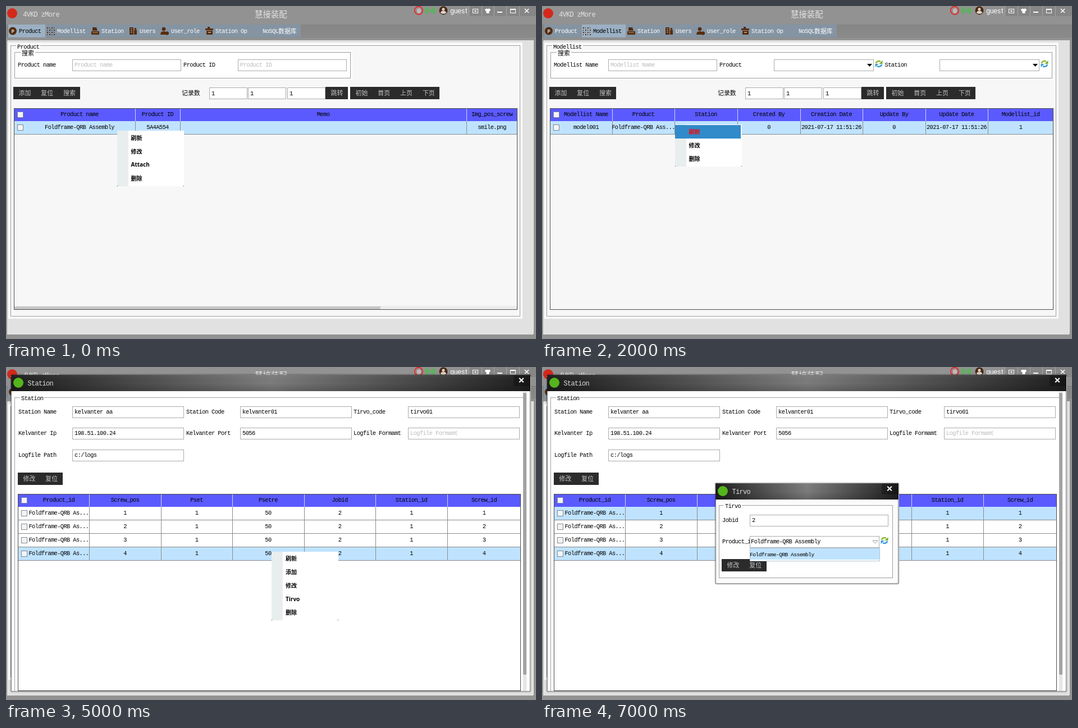
Recreate the animation shown at these times as an HTML page. Size 944 px wide and 593 px high, loop 8 s.

```html
<!DOCTYPE html>
<html lang="zh">
<head>
<meta charset="utf-8">
<title>Station manager</title>
<style>
  html, body { margin: 0; width: 100%; height: 100%; overflow: hidden; background: #929292; }
  #stage { display: block; width: 100vw; height: 100vh; }
  #stage rect { shape-rendering: crispEdges; }
  text { font-family: "Noto Sans CJK SC", "Noto Sans CJK", sans-serif; white-space: pre; }
  text.mono { font-family: "Liberation Mono", monospace; letter-spacing: -.058em; }
  text.ui { font-family: "Open Sans", "Noto Sans CJK SC", "Noto Sans CJK", sans-serif; font-weight: 700; }
</style>
</head>
<body>
<svg id="stage" viewBox="0 0 944 593" preserveAspectRatio="none"></svg>
<script>
const STEP = 1000;
const MONO = 10.4, CJK = 10.9, TITLE = 12, ADVANCE = 5.64;
const BLUE = '#5a5aff', PICK = '#bfe3ff', DARK = '#2b2b2b', BROWN = '#572c0c';
const PART = 'Foldframe-QRB Assembly', UNIT = 'kelvanter aa';
const EDIT = ['修改', '复位'];

const fill = (x, y, x2, y2, c, more = '') =>
  `<rect x="${x}" y="${y}" width="${x2 - x}" height="${y2 - y}" fill="${c}" ${more}/>`;

const frame = (x, y, x2, y2, line, c = 'none') =>
  `<rect x="${x + .5}" y="${y + .5}" width="${x2 - x - 1}" height="${y2 - y - 1}" fill="${c}" stroke="${line}"/>`;

const path = (d, c, w = 0) => w
  ? `<path d="${d}" fill="none" stroke="${c}" stroke-width="${w}"/>`
  : `<path d="${d}" fill="${c}"/>`;

const dot = (x, y, r, c) => `<circle cx="${x}" cy="${y}" r="${r}" fill="${c}"/>`;

const isCjk = s => /[\u4e00-\u9fff]/.test(s);

// Text placed by its vertical middle.
function text(x, cy, s, { c = '#000', size = isCjk(s) ? CJK : MONO, mid = false, ui = false } = {}) {
  const y = cy + size * (isCjk(s) ? .37 : .33);
  const kind = ui ? 'ui' : isCjk(s) ? 'cjk' : 'mono';
  return `<text class="${kind}" x="${x}" y="${y.toFixed(2)}" font-size="${size}" fill="${c}"` +
    `${mid ? ' text-anchor="middle"' : ''}>${s}</text>`;
}

const legend = (x, cy, s, bg) =>
  fill(x - 2, cy - 5, x + s.length * (isCjk(s) ? CJK : ADVANCE) + 2, cy + 5, bg) + text(x, cy, s);

const checkbox = (x, cy) => frame(x, cy - 5, x + 11, cy + 6, '#7d8a94', '#f4f4f4');

function buttons(x, y, labels) {
  return fill(x, y, Math.round(x + labels.length * 39.8), y + 22, DARK) +
    labels.map((s, i) => text(x + 9.5 + i * 39.8, y + 10.5, s, { c: '#c4c4c4' })).join('');
}

function refresh(x, y) {
  return path(`M${x - 5} ${y - 1}A5 4.6 0 0 1 ${x + 3} ${y - 4}`, '#8dbb2c', 2.6) +
    path(`M${x + 6.5} ${y - 6}v6h-6z`, '#6fae2e') +
    path(`M${x + 5} ${y + 1}A5 4.6 0 0 1 ${x - 3} ${y + 4}`, '#3a9bdc', 2.6) +
    path(`M${x - 6.5} ${y + 6}v-6h6z`, '#3a9bdc');
}

// kind: '' plain, 'hint' placeholder, 'combo' closed list, 'open' opened list
function field(labelX, x, x2, cy, label, value = '', kind = '') {
  const combo = kind === 'combo' || kind === 'open';
  const right = combo ? x2 - 16 : x2;
  let s = text(labelX, cy, label) + frame(x, cy - 10, right, cy + 11, '#a9abb0', '#fff') +
    text(x + (combo ? 2 : 4), cy, value, { c: kind === 'hint' ? '#bcbcbc' : '#000' });
  if (combo) {
    const arrow = `M${right - 12} ${cy - 2}h9l-4.5 5z`;
    s += kind === 'open' ? path(arrow, '#999', 1) : path(arrow, '#000');
    s += refresh(x2 - 7, cy - 2);
  }
  return s;
}

function table({ x, y, cols, heads, rows, picked, bottom, indent, bg }) {
  const right = cols[cols.length - 1], pitch = 24;
  const cell = (i, top, s) => {
    const l = i ? cols[i - 1] : x + indent, w = cols[i] - l;
    return `<svg x="${l}" y="${top}" width="${w}" height="${pitch}">` +
      text(w / 2, 11, s, { mid: true }) + '</svg>';
  };
  const band = (cells, top, height, color, line) =>
    fill(x, top, right, top + height, color) +
    cols.slice(0, -1).map(c => fill(c, top, c + 1, top + height, line)).join('') +
    cells.map((s, i) => cell(i, top, s)).join('') +
    checkbox(x + 6, top + 11);
  let s = frame(x, y, right, bottom, '#4c4c4c', bg) + band(heads, y, 23, BLUE, '#d5d5ff');
  rows.forEach((r, i) => {
    const top = y + 23 + i * pitch, end = top + pitch - 1;
    s += band(r, top, pitch, picked.includes(i) ? PICK : '#fff', '#8a8a8a') +
      fill(x, end, right, end + 1, '#8a8a8a');
  });
  return s + frame(x, y, right, bottom, '#4c4c4c');
}

function menu(x, y, items, hot = -1) {
  const w = 119, h = items.length * 24 + 2.5;
  let s = fill(x, y, x + w, y + h, '#fff') + fill(x, y, x + 20, y + h, '#e8eeee') +
    fill(x, y + h - 1, x + 1, y + h, '#333') + fill(x + w - 1, y + h - 1, x + w, y + h, '#333');
  items.forEach((item, i) => {
    if (i === hot) s += fill(x, y + 1 + i * 24, x + w - 2, y + 25 + i * 24, '#318ac9');
    s += text(x + 25, y + 13 + i * 24, item, { c: i === hot ? '#f00' : '#000', size: 10, ui: true });
  });
  return s;
}

function windowBox(x, y, x2, y2, title) {
  const cx = x2 - 16, cy = y + 9.5;
  return `<rect x="${x - .5}" y="${y - .5}" width="${x2 - x + 1}" height="${y2 - y + 1}" rx="3" fill="#fff" stroke="#000" stroke-opacity=".16" stroke-width="3"/>` +
    frame(x, y, x2, y2, '#808080', '#fbfbfb') +
    fill(x, y, x2, y + 29, 'url(#bar)') + fill(x, y, x2, y + 29, 'url(#gloss)') +
    fill(x2 - 30, y + 1, x2 - 1, y + 20, '#000', 'opacity=".3"') +
    path(`M${cx - 3.8} ${cy - 3.8}l7.6 7.6m0 -7.6l-7.6 7.6`, '#fff', 2) +
    dot(x + 13, y + 14, 9, '#55b51c') +
    text(x + 29.5, y + 15.5, title, { c: '#dcdcdc', size: TITLE });
}

// Small centred form; each row is [label, value, kind].
function dialog(y, title, rows) {
  const n = rows.length * 38.2;
  const at = d => Math.round(y + d + n);
  return windowBox(309, y, 635, at(103), title) +
    frame(315, y + 39, 625, at(93), '#a0a0a0', '#fff') +
    legend(326, y + 41, title, '#fff') +
    rows.map(([a, b, k], i) => field(321, 370, 617, Math.round(y + 66 + i * 38.2), a, b, k)).join('') +
    buttons(320, at(59), EDIT);
}

const icons = [
  dot(12, 44.5, 7, BROWN) + text(12, 44.7, 'P', { c: '#c9d3dc', size: 9, mid: true, ui: true }),
  [0, 1, 2, 3].map(i => [0, 1, 2, 3].map(j =>
    fill(73 + i * 4, 38 + j * 4, 75 + i * 4 - (i + j) % 2, 40 + j * 4, BROWN)).join('')).join(''),
  path('M154 38h7l2 6h-9zM152 45h14v6h-14z', BROWN) + fill(154, 47, 164, 48, '#a5937f'),
  path('M220 38h7v13h-7zM228 43h5v8h-5z', BROWN) + dot(230.5, 41, 2, BROWN) +
    [40, 43, 46].map(y => fill(222, y, 225, y + 1, '#b9aa9a')).join(''),
  dot(281, 41, 3.3, BROWN) + path('M275 51q0 -6 6 -6t5 6zM287 45l3 2v3l-3 2l-3 -2v-3z', BROWN),
  path('M355 40h14v3h-14zM357 44h11v7h-11zM359 37h4v3h-4z', BROWN) + fill(360, 46, 365, 48, '#a5937f'),
  ''
];

const TABS = [[4, 23, 'Product'], [71, 91, 'Modellist'], [150, 170, 'Station'], [217, 238, 'Users'],
  [274, 294, 'User_role'], [353, 373, 'Station Op'], [438, 457, 'NoSQL']];

function chrome(active) {
  let s = fill(0, 0, 944, 593, '#929292') + fill(0, 33, 944, 57, 'url(#strip)');
  s += dot(11, 13, 9, '#d5281c');
  s += text(30, 15.5, '4VKD zMore', { c: '#e4e4e4', size: TITLE });
  s += text(443, 15, '慧接装配', { c: '#e4e4e4', size: 14.4 });
  TABS.forEach(([x, tx, name], i) => {
    const x2 = TABS[i + 1] ? TABS[i + 1][0] : 525, on = i === active;
    s += fill(x, 33, x2, 56, on ? '#9bb0c4' : '#8494a3') + fill(x2 - 1, 33, x2, 56, '#8c9299') +
      icons[i] + text(tx, 44.5, name, { c: on ? '#000' : '#fff' });
  });
  s += text(485, 44.5, '数据库', { c: '#fff' });

  s += `<circle cx="735" cy="8" r="7.2" fill="#a08c8c" stroke="#f01818" stroke-width="1.5"/>` +
    text(735, 8, '0', { c: '#fff', size: 11.5, mid: true });
  s += dot(755.5, 8, 2, '#2bd12b') +
    path('M752 3.5q-3 4.5 0 9M759 3.5q3 4.5 0 9M750 1.5q-5 6.5 0 13M761 1.5q5 6.5 0 13', '#2bd12b', 1.3);
  s += dot(779, 8, 7.5, '#4a2710') + dot(779, 5.8, 2.6, '#d8d0c8') + path('M774 12.5q0 -4 5 -4t5 4q-5 3 -10 0z', '#d8d0c8');
  s += `<svg x="791" y="0" width="30" height="20">${text(0, 9, 'guest', { c: '#fff', size: TITLE })}</svg>`;
  s += fill(824, 0, 944, 18, '#868686') +
    [824, 847, 869, 891, 914].map(x => fill(x, 0, x + 1, 18, '#a6a6a6')).join('');
  s += frame(831, 5, 841, 13, '#fff') + path('M833.5 8h5l-2.5 3z', '#fff');
  s += path('M853 6l3 -1.5q2 1.5 4 0l3 1.5l-1 3h-1.5v4h-5v-4h-1.5z', '#fff');
  s += fill(875, 10, 884, 11.5, '#fff') + frame(898, 5, 908, 13, '#fff') + fill(898, 5, 908, 7, '#fff');
  s += path('M924 5l7 7m0 -7l-7 7', '#fff', 1.5);

  s += `<rect x="2" y="61" width="938" height="524" rx="2" fill="#e1e1e1"/>`;
  return s + fill(4, 65, 920, 557, '#f9f9f9');
}

const HEAD = { x: 14, y: 182, bottom: 541, indent: 18, bg: '#f7f7f7', picked: [0] };
const SLOTS = [[21, 118, 312], [316, 413, 607], [610.5, 708, 902]];
const DATE = '2021-07-17 11:51:26';

const PAGES = [
  { title: 'Product', right: 614, thumb: 667,
    fields: [['Product name', 'Product name', 'hint'], ['Product ID', 'Product ID', 'hint']],
    cols: [230, 310, 820, 911],
    heads: ['Product name', 'Product ID', 'Memo', 'Img_pos_screw'],
    rows: [[PART, '5A4A554', '', 'smile.png']] },
  { title: 'Modellist', right: 909,
    fields: [['Modellist Name', 'Modellist Name', 'hint'], ['Product', '', 'combo'], ['Station', '', 'combo']],
    cols: [125, 236, 348, 460, 571, 683, 794, 911],
    heads: ['Modellist Name', 'Product', 'Station', 'Created By', 'Creation Date', 'Update By', 'Update Date', 'Modellist_id'],
    rows: [['model001', PART.slice(0, 17) + '...', UNIT, '0', DATE, '0', DATE, '1']] },
  { title: 'Station', right: 909, thumb: 712,
    fields: [['Station Name', 'Station Name', 'hint'], ['Station Code', 'Station Code', 'hint'], ['Tirvo_code']],
    cols: [111, 190, 270, 350, 393, 593, 792, 836, 911],
    heads: ['Station Name', 'Station Code', 'Tirvo_code', 'Kelvanter Ip', 'Kelvanter Port', 'Logfile Formamt', 'Logfile Path', 'Created By', '    Creation Date'],
    rows: [[UNIT, 'kelvanter01', 'tirvo01', '198.51.100.24', '5056', '', 'c:/logs', '0', '   2021-06-26 09:14']] }
];

function page(i) {
  const p = PAGES[i];
  let s = chrome(i) + frame(8, 70, 916, 553, '#a0a0a0', '#f7f7f7') + legend(20, 72.5, p.title, '#f9f9f9');
  s += fill(13, 79, p.right + 3, 131, '#fff') + frame(15, 82, p.right, 129, '#9a9a9f') + legend(28, 84, '搜索', '#fff');
  p.fields.forEach((f, k) => s += field(...SLOTS[k], 105, ...f));
  s += buttons(13, 144, ['添加', '复位', '搜索']) + text(313, 155, '记录数');
  [362, 431, 501].forEach(x => s += frame(x, 145, x + 68, 166, '#a9abb0', '#fff') + text(x + 4, 155.5, '1'));
  s += buttons(569, 144, ['跳转']) + buttons(613, 144, ['初始', '首页', '上页', '下页']);
  s += table({ ...HEAD, ...p });
  if (p.thumb) s += fill(15, 534, 910, 540, '#ececec') + fill(15, 535, p.thumb, 540, '#c6c6c6', 'rx="2"');
  return s;
}

function stationWindow(picked) {
  const slots = [[22, 118, 317], [321, 417, 616], [619, 716, 915]];
  const fields = [['Station Name', UNIT], ['Station Code', 'kelvanter01'], ['Tirvo_code', 'tirvo01'],
    ['Kelvanter Ip', '198.51.100.24'], ['Kelvanter Port', '5056'], ['Logfile Formamt', 'Logfile Formamt', 'hint'],
    ['Logfile Path', 'c:/logs']];
  let s = page(2) + windowBox(9, 14, 934, 578, 'Station') + fill(10, 43, 920, 577, '#fff');
  s += fill(15, 54, 921, 55, '#a0a0a0') + fill(15, 54, 16, 577, '#a0a0a0') + legend(27, 56, 'Station', '#fff');
  s += fill(921, 44, 927, 577, '#e6e6e6') +
    `<rect x="921" y="46" width="6" height="502" rx="3" fill="#a3a3a3"/>`;
  fields.forEach((f, i) => s += field(...slots[i % 3], 80 + Math.round(Math.floor(i / 3) * 38.3), ...f));
  s += buttons(21, 188, EDIT);
  s += table({
    x: 21, y: 226, bottom: 577, indent: 19, bg: '#fff', picked,
    cols: [148, 276, 403, 531, 658, 786, 917],
    heads: ['Product_id', 'Screw_pos', 'Pset', 'Psetre', 'Jobid', 'Station_id', 'Screw_id'],
    rows: [1, 2, 3, 4].map(n => [PART.slice(0, 16) + '...', n, 1, 50, 2, 1, n].map(String))
  });
  return s;
}

const dropList = frame(370, 322, 602, 346, '#b4c4d0', '#fff') + fill(371, 323, 601, 343, PICK) +
  text(370, 333.5, PART, { size: 9.65 });

const scenes = [
  page(0) + menu(197.5, 222, ['刷新', '修改', 'Attach', '删除']),
  page(0) + dialog(187, 'Product', [['Product name', PART], ['Product ID', '5A4A554'], ['Memo', 'Memo', 'hint']]),
  page(1) + menu(236.5, 211, ['刷新', '修改', '删除'], 0),
  page(1) + dialog(187, 'Modellist', [['Modellist Name', 'model001'], ['Product', PART, 'combo'], ['Station', UNIT, 'combo']]),
  page(2) + menu(406, 222, ['刷新', '修改', 'Mesconfig', '删除']),
  stationWindow([3]) + menu(473, 328.5, ['刷新', '添加', '修改', 'Tirvo', '删除']),
  stationWindow([0, 3]) + dialog(168, 'Product_screw',
    [['Product_id', PART, 'combo'], ['Screw_pos', '1'], ['Pset', '1'], ['Psetre', '50']]),
  stationWindow([0, 3]) + dialog(207, 'Tirvo', [['Jobid', '2'], ['Product_id', PART, 'open']]) + dropList
];

const gradient = (id, dir, stops) => `<linearGradient id="${id}" ${dir}>` +
  stops.map(([o, c, a = 1]) => `<stop offset="${o}" stop-color="${c}" stop-opacity="${a}"/>`).join('') + '</linearGradient>';
const DOWN = 'x2="0" y2="1"';

const stage = document.getElementById('stage');
stage.innerHTML = '<defs>' +
  gradient('bar', '', [[0, '#1c1c1c'], [.5, '#7c7c7c'], [1, '#1e1e1e']]) +
  gradient('gloss', DOWN, [[0, '#fff', .04], [.5, '#000', 0], [1, '#000', .18]]) +
  gradient('strip', DOWN, [[0, '#868686'], [1, '#8a8a8a']]) + '</defs>' +
  scenes.map(s => `<g class="scene" display="none">${s}</g>`).join('');

const groups = stage.querySelectorAll('.scene');
const start = performance.now();
let shown = -1;

function tick() {
  const now = Math.floor((performance.now() - start) / STEP) % groups.length;
  if (now !== shown) {
    groups.forEach((g, i) => g.setAttribute('display', i === now ? 'inline' : 'none'));
    shown = now;
  }
  requestAnimationFrame(tick);
}
tick();
</script>
</body>
</html>
```
